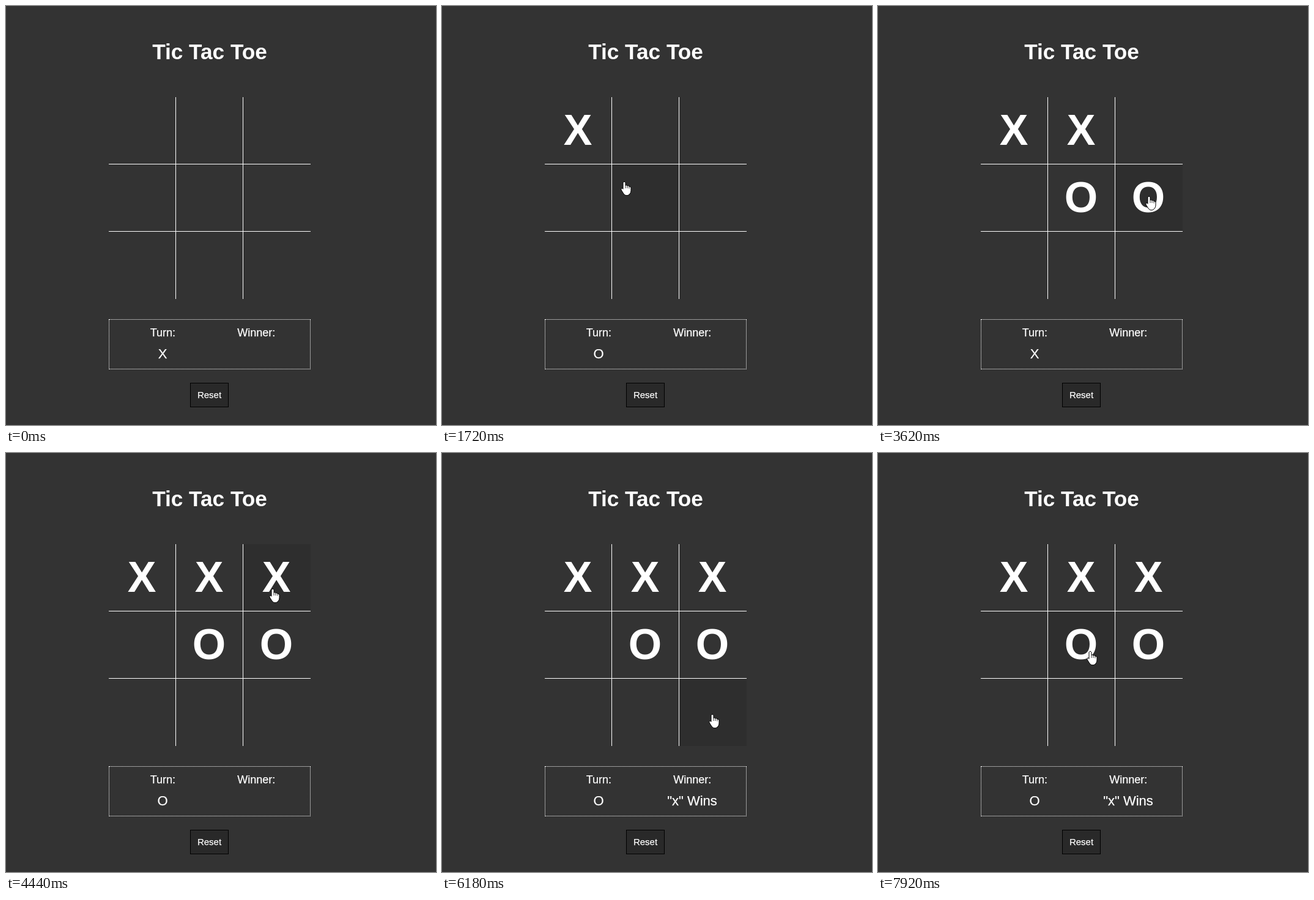
These frames come from a looping animation (703x685 px, 7.99 s). An HTML page:

```html
<!DOCTYPE html>
<html lang="en">
<head>
<meta charset="utf-8">
<title>Tic Tac Toe</title>
<style>
  html, body { margin: 0; width: 100%; height: 100%; overflow: hidden; background: #333; }
  #status {
    position: absolute; left: 168px; top: 512px; width: 330px; height: 82px;
    box-sizing: border-box; border: 1px dotted #fff;
  }
  svg { position: absolute; left: 0; top: 0; }
  text { font-family: "Liberation Sans", Arial, sans-serif; fill: #fff; text-anchor: middle; }
  .title { font-size: 35.2px; font-weight: bold; }
  .mark { font-size: 70px; font-weight: bold; }
  .label { font-size: 18px; }
  .value { font-size: 22px; }
  .reset { font-size: 15px; }
  .label, .value, .reset { stroke: #fff; stroke-width: .25px; }
  #beam { mix-blend-mode: difference; }
</style>
</head>
<body>
<div id="status"></div>
<svg width="703" height="685" viewBox="0 0 703 685">
  <rect id="hover" width="110" height="110" fill="#2e2e2e"/>
  <path fill="#fff" d="M277 149h1v330h-1zM387 149h1v330h-1zM168 258h330v1h-330zM168 368h330v1h-330z"/>
  <text class="title" x="333" y="86.5">Tic Tac Toe</text>
  <g id="marks"></g>
  <text class="label" x="256.3" y="540">Turn:</text>
  <text class="label" x="409.3" y="540">Winner:</text>
  <text class="value" id="turn" x="256" y="576">X</text>
  <text class="value" id="winner" x="409" y="576">"x" Wins</text>
  <rect x="301.5" y="616.5" width="62" height="39" fill="#292929" stroke="#000"/>
  <text class="reset" x="332.5" y="641">Reset</text>
  <g id="hand" stroke="#000">
    <path fill="#fff" d="M-2 1.8Q0-1.4 2 1.8V6.2Q3.8 5.2 5 7Q6.8 6 8 8Q10.8 7.4 11 10.5V15Q10.8 18 9.2 20Q7 22.8 4 22.8Q1 22.8-1 20L-4.8 14Q-6 11.4-4 10.9Q-3 10.8-2 12.3Z"/>
    <path fill="none" stroke-width=".8" d="M2 6v5M5 7v4M8 8v3.5"/>
  </g>
  <path id="arrow" fill="#fff" stroke="#000" d="M.5.5V17L4.3 13.4 6.8 19.2 9.3 18.2 6.8 12.5H12Z"/>
  <path id="beam" fill="#fff" d="M-3-7h3v1h-3zM1-7h3v1h-3zM0-6h1v13h-1zM-3 7h3v1h-3zM1 7h3v1h-3z"/>
</svg>
<script>
const LOOP = 7990, STEP = 70, CELL = 110, LEFT = 168, TOP = 149;
const $ = id => document.getElementById(id);

// Pointer moves: start time, number of steps, goal x, goal y
const ENTRY = [505, 611], APPEARS = 200;
const legs = [
  [200, 9, 208, 208], [1160, 8, 298, 287], [2050, 4, 312, 277],
  [2520, 2, 317, 249], [2660, 4, 331, 212], [2940, 5, 443, 311],
  [3620, 7, 436, 222], [4710, 8, 374, 579], [5480, 4, 332, 586],
  [5760, 8, 462, 397], [6400, 7, 228, 323], [6890, 4, 488, 432],
  [7230, 7, 334, 301], [7720, 2, 347, 324]
];
const clicks = [1160, 2050, 2940, 3550, 4110], WIN = 4710;

const show = (el, on) => el.setAttribute("visibility", on ? "visible" : "hidden");
const inside = (x, y, l, t, w, h) => x >= l && x < l + w && y >= t && y < t + h;
const onBoard = (x, y) => inside(x, y, LEFT, TOP, 3 * CELL, 3 * CELL);
const cellAt = (x, y) => [Math.floor((x - LEFT) / CELL), Math.floor((y - TOP) / CELL)];

function pointer(t) {
  let [x, y] = ENTRY;
  for (const [start, steps, goalX, goalY] of legs) {
    if (t < start) break;
    const u = Math.min(1, Math.floor((t - start) / STEP) / steps);
    const ease = u * u * (3 - 2 * u);
    x += (goalX - x) * ease;
    y += (goalY - y) * ease;
  }
  return [Math.round(x), Math.round(y)];
}

// Each click marks the cell under the pointer, in turns
const marks = clicks.map((time, i) => {
  const [col, row] = cellAt(...pointer(time));
  const el = document.createElementNS("http://www.w3.org/2000/svg", "text");
  el.setAttribute("class", "mark");
  el.setAttribute("x", 222 + CELL * col);
  el.setAttribute("y", 226.7 + CELL * row);
  el.textContent = "XO"[i % 2];
  $("marks").append(el);
  return el;
});

function cursorKind(x, y, won) {
  if (onBoard(x, y) || inside(x, y, 301, 616, 63, 40)) return "hand";
  const onText = inside(x, y, 236, 523, 41, 22) || inside(x, y, 379, 523, 61, 22) ||
    won && inside(x, y, 368, 556, 83, 27);
  return onText ? "beam" : "arrow";
}

function draw(t) {
  const done = clicks.filter(time => time <= t).length, won = t >= WIN;
  marks.forEach((el, i) => show(el, i < done));
  $("turn").textContent = "XO"[done % 2];
  show($("winner"), won);

  const active = t >= APPEARS, [x, y] = pointer(t);
  const kind = active && cursorKind(x, y, won);
  for (const id of ["hand", "arrow", "beam"]) {
    show($(id), id === kind);
    $(id).setAttribute("transform", `translate(${x} ${y})`);
  }

  const [col, row] = cellAt(x, y);
  show($("hover"), active && onBoard(x, y));
  $("hover").setAttribute("x", LEFT + CELL * col);
  $("hover").setAttribute("y", TOP + CELL * row);
}

const origin = performance.now();
function tick() {
  draw((performance.now() - origin) % LOOP);
  requestAnimationFrame(tick);
}
tick();
</script>
</body>
</html>
```
